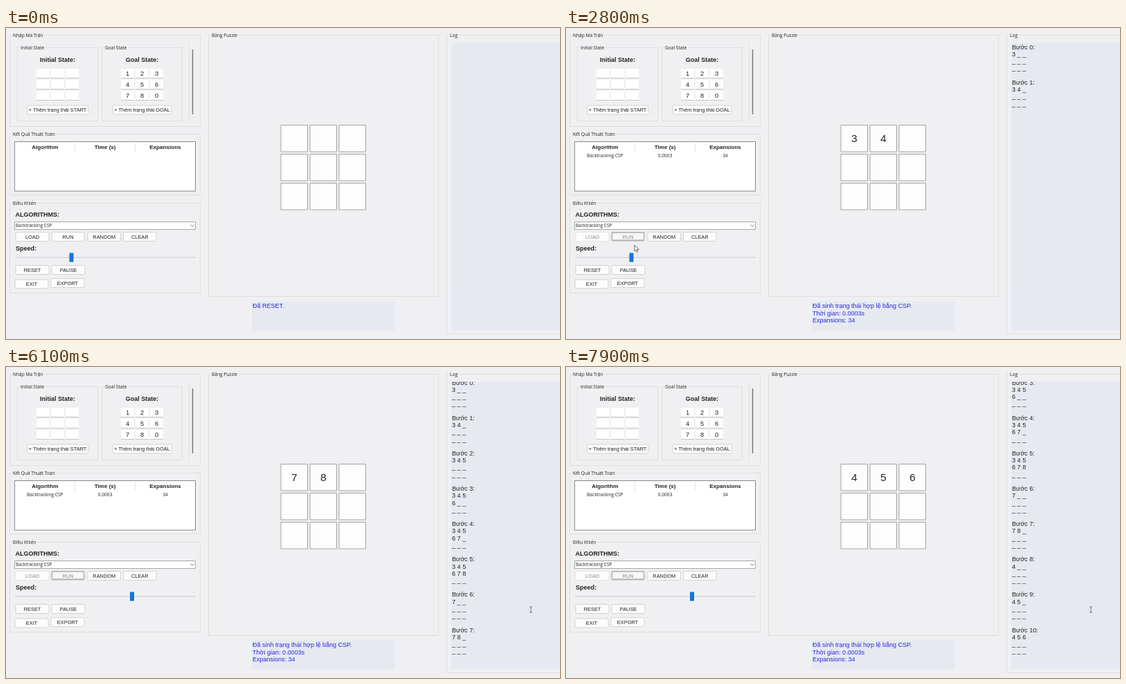
An HTML page with a canvas that plays this animation: 800x450 px, repeating every 8000 ms.

```html
<!DOCTYPE html>
<html lang="vi">
<head>
<meta charset="utf-8">
<style>
  html, body { margin: 0; width: 100%; height: 100%; overflow: hidden; background: #f0f0f2; }
  canvas { display: block; }
</style>
</head>
<body>
<canvas id="stage" width="800" height="450"></canvas>
<script>
const ctx = document.getElementById('stage').getContext('2d');
const LOOP = 8000, BG = '#f0f0f2', PANEL = '#e6eaf0', INK = '#222';
const ARIAL = '"Liberation Sans", Arial, sans-serif';
const UI = '"Open Sans", "Noto Sans", sans-serif';

// Cells filled at each search step, and the time each step appears
const steps = ['3', '34', '345', '3456', '34567', '345678', '7', '78', '4', '45', '456'];
const stepTime = i => i < 3 ? 1320 + i * 1030 : 3380 + (i - 2) * 530;
const LOADED = 600, RUN = 1250;

// [time, x, y]
const arrowPath = [[150, 180, 8], [500, 45, 301], [850, 45, 301], [1150, 83, 304],
  [1900, 83, 304], [2500, 99, 314], [2850, 99, 314], [3050, 94, 329], [3550, 182, 331],
  [3750, 190, 335], [4300, 190, 335], [4800, 420, 300]];
const beamPath = [[5200, 773, 180], [5500, 760, 330], [5900, 758, 351], [8000, 758, 351]];
const knobPath = [[3050, 94.5, 0], [3550, 182, 0]];

function along(path, t) {
  if (t <= path[0][0]) return path[0].slice(1);
  for (let i = 1; i < path.length; i++) {
    const [t0, x0, y0] = path[i - 1], [t1, x1, y1] = path[i];
    if (t <= t1) {
      const k = (t - t0) / (t1 - t0), e = k * k * (3 - 2 * k);
      return [x0 + (x1 - x0) * e, y0 + (y1 - y0) * e];
    }
  }
  return path[path.length - 1].slice(1);
}

function text(s, x, y, size, { align = 'left', color = INK, bold = false, face = ARIAL } = {}) {
  ctx.font = `${bold ? 'bold ' : ''}${size}px ${face}`;
  ctx.textAlign = align;
  ctx.fillStyle = color;
  ctx.fillText(s, x, y);
}

function box(x, y, w, h, fill, stroke, radius = 0) {
  ctx.beginPath();
  ctx.roundRect(x, y, w, h, radius);
  if (fill) { ctx.fillStyle = fill; ctx.fill(); }
  if (stroke) { ctx.strokeStyle = stroke; ctx.lineWidth = 1; ctx.stroke(); }
}

function line(x0, y0, x1, y1, color, width = 1) {
  ctx.beginPath();
  ctx.moveTo(x0, y0);
  ctx.lineTo(x1, y1);
  ctx.strokeStyle = color;
  ctx.lineWidth = width;
  ctx.stroke();
}

function group(label, x, y, w, h) {
  box(x, y, w, h, null, '#dededf');
  ctx.font = `6.6px ${UI}`;
  ctx.fillStyle = BG;
  ctx.fillRect(x + 3, y - 3, ctx.measureText(label).width + 3, 6);
  text(label, x + 4.5, y + 2.5, 6.6, { face: UI });
}

function button(label, x, y, w, { off = false, focus = false } = {}) {
  box(x + .5, y + .5, w - 1, 13, '#fcfcfc', off && !focus ? '#e6e6e6' : '#d2d2d2', 1.5);
  if (focus) {
    box(x + .5, y + .5, w - 1, 12, '#f7f7f7', '#b4b4b6');
    ctx.setLineDash([1, 1]);
    box(x + 1.5, y + 1.5, w - 3, 10, null, '#999');
    ctx.setLineDash([]);
  }
  text(label, x + w / 2, y + 9.6, 7.4, { align: 'center', color: off ? '#8c8c8c' : INK });
}

function entries(left, values) {
  for (let i = 0; i < 9; i++) {
    const x = left + i % 3 * 21, y = 59 + Math.floor(i / 3) * 16;
    box(x, y, 19, 13, '#fff');
    line(x, y + 13.5, x + 19, y + 13.5, '#c4c4c4');
    text(values[i] || '', x + 9.5, y + 10.3, 9.3, { align: 'center' });
  }
}

function inputs() {
  group('Nhập Ma Trận', 5.5, 10.5, 275, 132);
  group('Initial State', 16.5, 28.5, 116, 106);
  group('Goal State', 138.5, 28.5, 116, 106);
  text('Initial State:', 74.5, 49, 9, { align: 'center', bold: true });
  text('Goal State:', 196.5, 49, 9, { align: 'center', bold: true });
  entries(44, '');
  entries(166, '123456780');
  button('+ Thêm trạng thái START', 30, 111.5, 89);
  button('+ Thêm trạng thái GOAL', 153.5, 111.5, 86);
  line(264.5, 22, 264.5, 135, '#e0e0e1');
  line(269.5, 31, 269.5, 125, '#777', 1.5);
}

function results(done) {
  group('Kết Quả Thuật Toán', 5.5, 153.5, 275, 88);
  box(12.5, 164.5, 261, 71.5, '#fff', '#85878b');
  ['Algorithm', 'Time (s)', 'Expansions'].forEach((s, i) => {
    const x = 56.3 + i * 86.8;
    text(s, x, 174.8, 8.1, { align: 'center', bold: true });
    if (i) line(12.5 + i * 87, 166, 12.5 + i * 87, 179, '#e3e3e3');
    if (done) text(['Backtracking CSP', '0.0003', '34'][i], x, 186.6, 6.6, { align: 'center', face: UI });
  });
}

function controls(t, done) {
  group('Điều Khiển', 5.5, 253.5, 275, 130);
  text('ALGORITHMS:', 13.5, 273.3, 9, { bold: true });
  box(12.5, 280.5, 261, 11, '#fff', '#a4a6a8');
  text('Backtracking CSP', 14, 288.4, 6.6, { face: UI });
  line(266.5, 284.8, 269, 287.2, '#555', .8);
  line(269, 287.2, 271.5, 284.8, '#555', .8);
  button('LOAD', 13.5, 295, 49, { off: done });
  button('RUN', 65.5, 295, 48, { off: done, focus: done });
  button('RANDOM', 117.5, 295, 48.5);
  button('CLEAR', 169, 295, 48.5);
  text('Speed:', 14, 321.7, 9, { bold: true });
  line(13, 332, 274, 332, '#d9d9da', 1.5);
  box(along(knobPath, t)[0] - 3, 325.5, 6, 13, '#1476d4');
  button('RESET', 13.5, 343, 49);
  button('PAUSE', 65.5, 343, 49);
  button('EXIT', 12.5, 363.5, 49);
  button('EXPORT', 64.5, 362, 49);
}

function board(cells) {
  group('Bảng Puzzle', 292.5, 10.5, 332, 378);
  for (let i = 0; i < 9; i++) {
    const x = 397 + i % 3 * 42, y = 140.5 + Math.floor(i / 3) * 42;
    box(x, y, 38.5, 38.5, '#fdfdfd', '#a3a3a4');
    text(cells[i] || '', x + 19.3, y + 24.8, 15.5, { align: 'center' });
  }
}

function status(t) {
  box(355, 395.5, 207, 43, PANEL);
  const lines = t < LOADED ? ['Đã RESET.'] : ['Đã sinh trạng thái hợp lệ bằng CSP.'];
  if (t >= RUN) lines.push('Thời gian: 0.0003s', 'Expansions: 34');
  lines.forEach((s, i) => text(s, 356, 405.2 + i * 10.3, 9, { color: '#2a2ae0' }));
}

function log(last) {
  group('Log', 636.5, 10.5, 180, 432);
  box(643, 21.5, 157, 416, PANEL);
  ctx.save();
  ctx.beginPath();
  ctx.rect(643, 21.5, 157, 416);
  ctx.clip();
  const gap = 51.1, scroll = Math.max(0, last * gap - 352.7);
  for (let i = 0; i <= last; i++) {
    const y = 30.8 + i * gap - scroll;
    const cells = steps[i].padEnd(9, '_');
    text(`Bước ${i}:`, 644, y, 9.1);
    for (let r = 0; r < 3; r++)
      text([...cells.slice(r * 3, r * 3 + 3)].join(' '), 644, y + (r + 1) * 10.2, 9.1);
  }
  ctx.restore();
}

function pointer(t) {
  if (t >= 150 && t < 4800) {
    const [x, y] = along(arrowPath, t);
    ctx.save();
    ctx.translate(x, y);
    ctx.beginPath();
    [[0, 0], [0, 9], [2.1, 7.1], [3.5, 10.2], [4.9, 9.6], [3.5, 6.5], [6.3, 6.4]]
      .forEach(p => ctx.lineTo(...p));
    ctx.closePath();
    ctx.fillStyle = '#fff';
    ctx.fill();
    ctx.strokeStyle = '#444';
    ctx.lineWidth = .8;
    ctx.stroke();
    ctx.restore();
  } else if (t >= 5200) {
    const [x, y] = along(beamPath, t);
    line(x, y - 4, x, y + 4, '#666', .9);
    line(x - 2, y - 4, x + 2, y - 4, '#666', .9);
    line(x - 2, y + 4, x + 2, y + 4, '#666', .9);
  }
}

function draw(now) {
  const t = now % LOOP, done = t >= RUN;
  const last = steps.filter((_, i) => t >= stepTime(i)).length - 1;
  ctx.fillStyle = BG;
  ctx.fillRect(0, 0, 800, 450);
  inputs();
  results(done);
  controls(t, done);
  board(steps[last] || '');
  status(t);
  log(last);
  pointer(t);
}

const start = performance.now();
function tick() {
  draw(performance.now() - start);
  requestAnimationFrame(tick);
}
tick();
</script>
</body>
</html>
```
